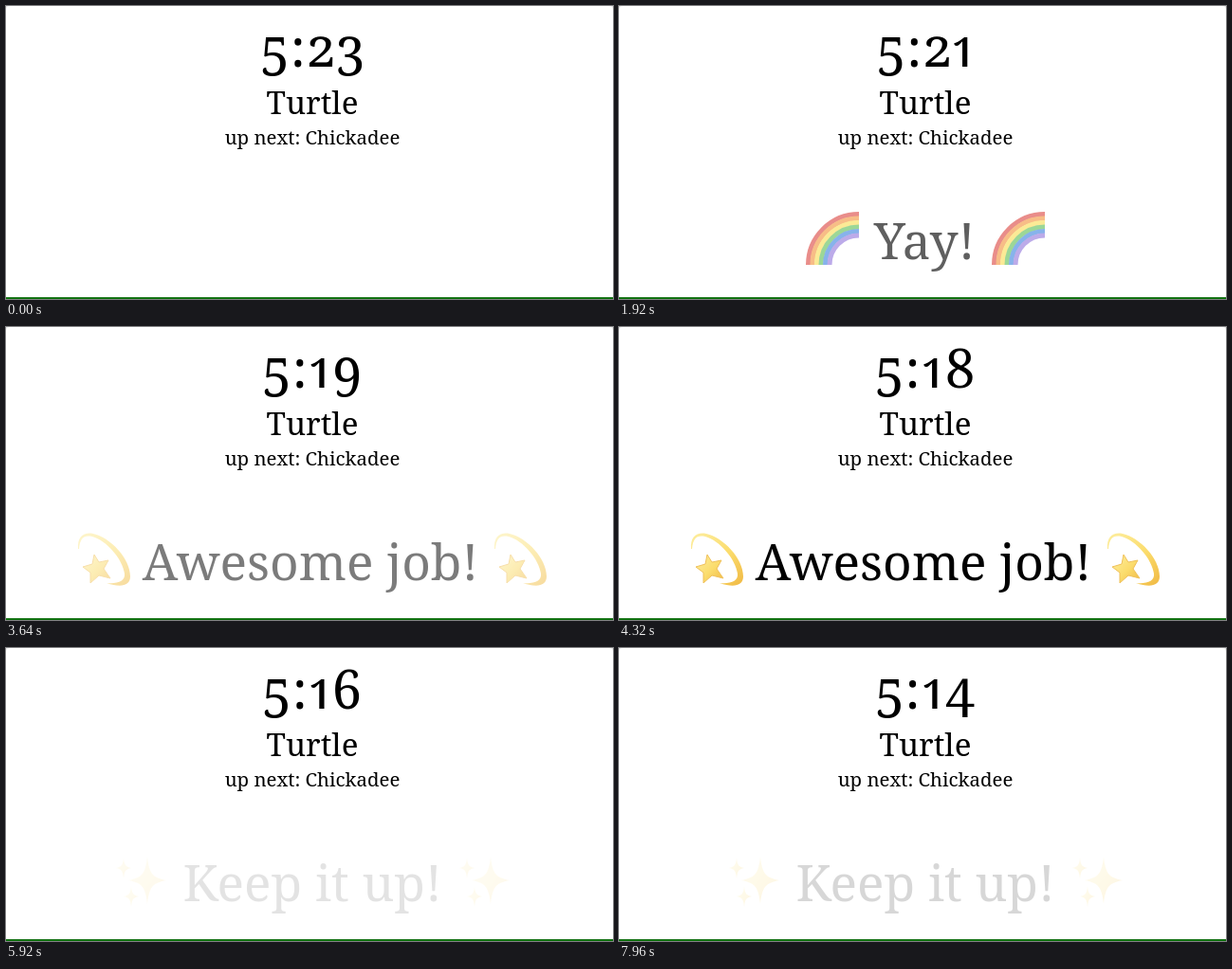
An HTML page for the animation above (8 s loop, 640x309 px).

```html
<!DOCTYPE html>
<html lang="en">
<head>
<meta charset="utf-8">
<title>Countdown</title>
<style>
  html, body { margin: 0; width: 100%; height: 100%; overflow: hidden; background: #e6e6e6; }
  svg { display: block; width: 640px; height: 309px; }
  text { font-family: "Noto Serif", serif; text-anchor: middle; fill: #000; }
  .clock { font-size: 56px; letter-spacing: 2.5px; font-variant-numeric: oldstyle-nums proportional-nums; animation: tick 8s infinite; }
  .name { font-size: 33.2px; }
  .next { font-size: 20.4px; }
  .msg { opacity: 0; animation: 8s linear infinite; }
  .msg text { font-size: 53.2px; }
  #yay { animation-name: yay; }
  #awesome { animation-name: awesome; }
  #keep { animation-name: keep; }

  /* one 80px row per count, a new one every 920 ms */
  @keyframes tick {
    0% { transform: translateY(0); animation-timing-function: step-end; }
    1.3% { transform: translateY(-80px); animation-timing-function: steps(8, end); }
    93.3%, 100% { transform: translateY(-720px); }
  }
  @keyframes yay {
    0%, 3.6% { opacity: 0; }
    16.75%, 18.9% { opacity: 1; }
    32.5%, 100% { opacity: 0; }
  }
  @keyframes awesome {
    0%, 38.7% { opacity: 0; }
    51.9%, 54% { opacity: 1; }
    67.5%, 100% { opacity: 0; }
  }
  @keyframes keep {
    0%, 72.6% { opacity: 0; }
    85.75%, 87.8% { opacity: 1; }
    100% { opacity: .12; }
  }
</style>
</head>
<body>
<svg viewBox="0 0 640 309">
  <defs>
    <clipPath id="row"><rect width="640" height="80"/></clipPath>
    <clipPath id="quarter"><rect width="56" height="56"/></clipPath>
    <linearGradient id="gold" x1="0" y1="0" x2="1" y2="1">
      <stop offset="0" stop-color="#fdeea0"/>
      <stop offset=".55" stop-color="#fbdc6c"/>
      <stop offset="1" stop-color="#f0b944"/>
    </linearGradient>
    <g id="rainbow" clip-path="url(#quarter)" fill="none" stroke-width="5">
      <circle cx="56" cy="56" r="53.5" stroke="#dc4a44"/>
      <circle cx="56" cy="56" r="49" stroke="#f3963f"/>
      <circle cx="56" cy="56" r="44.5" stroke="#f9de58"/>
      <circle cx="56" cy="56" r="40" stroke="#62bf5a"/>
      <circle cx="56" cy="56" r="35.5" stroke="#3f86e0"/>
      <circle cx="56" cy="56" r="31" stroke="#957add"/>
    </g>
    <g id="dizzy" fill="url(#gold)">
      <path d="M0 17C-1 4 6-1 16 1C34 5 55 27 55 46C55 56 45 58 30 53C42 54 50 51 49 43C47 28 30 8 15 4C6 2 2 6 1 17Z"/>
      <path d="M17 23L22 31L32 29L27 38L34 48L22 45L13 53L13 42L5 36L15 33Z" stroke="#efc05a" stroke-linejoin="round"/>
    </g>
    <path id="spark" d="M0-1C.1-.3 .25-.12 1 0C.25.12 .1.3 0 1C-.1.3-.25.12-1 0C-.25-.12-.1-.3 0-1Z"/>
    <g id="sparkles" fill="url(#gold)">
      <use href="#spark" transform="translate(33 26) scale(20 25)"/>
      <use href="#spark" transform="translate(8 13) scale(8 11)"/>
      <use href="#spark" transform="translate(16 43) scale(8 11)"/>
    </g>
  </defs>

  <path d="M0 309V4Q0 0 4 0H636Q640 0 640 4V309Z" fill="#fff"/>
  <g clip-path="url(#row)"><g class="clock" id="clock"></g></g>
  <text class="name" x="323" y="113.5">Turtle</text>
  <text class="next" x="323" y="145.5">up next: Chickadee</text>

  <g class="msg" id="yay">
    <use href="#rainbow" x="197" y="217"/>
    <text x="322" y="267">Yay!</text>
    <use href="#rainbow" x="393" y="217"/>
  </g>
  <g class="msg" id="awesome">
    <use href="#dizzy" x="76" y="217"/>
    <text x="321" y="267">Awesome job!</text>
    <use href="#dizzy" x="515" y="217"/>
  </g>
  <g class="msg" id="keep">
    <use href="#sparkles" x="116" y="219"/>
    <text x="323" y="267">Keep it up!</text>
    <use href="#sparkles" x="478" y="219"/>
  </g>

  <rect y="307" width="640" height="1" fill="#1e781e"/>
  <rect y="308" width="640" height="1" fill="#0a700a"/>
</svg>
<script>
  const clock = document.getElementById("clock");
  for (let i = 0; i < 10; i++) {
    const line = document.createElementNS("http://www.w3.org/2000/svg", "text");
    line.setAttribute("x", 324);
    line.setAttribute("y", 64 + 80 * i);
    line.textContent = "5:" + (23 - i);
    clock.append(line);
  }
</script>
</body>
</html>
```
